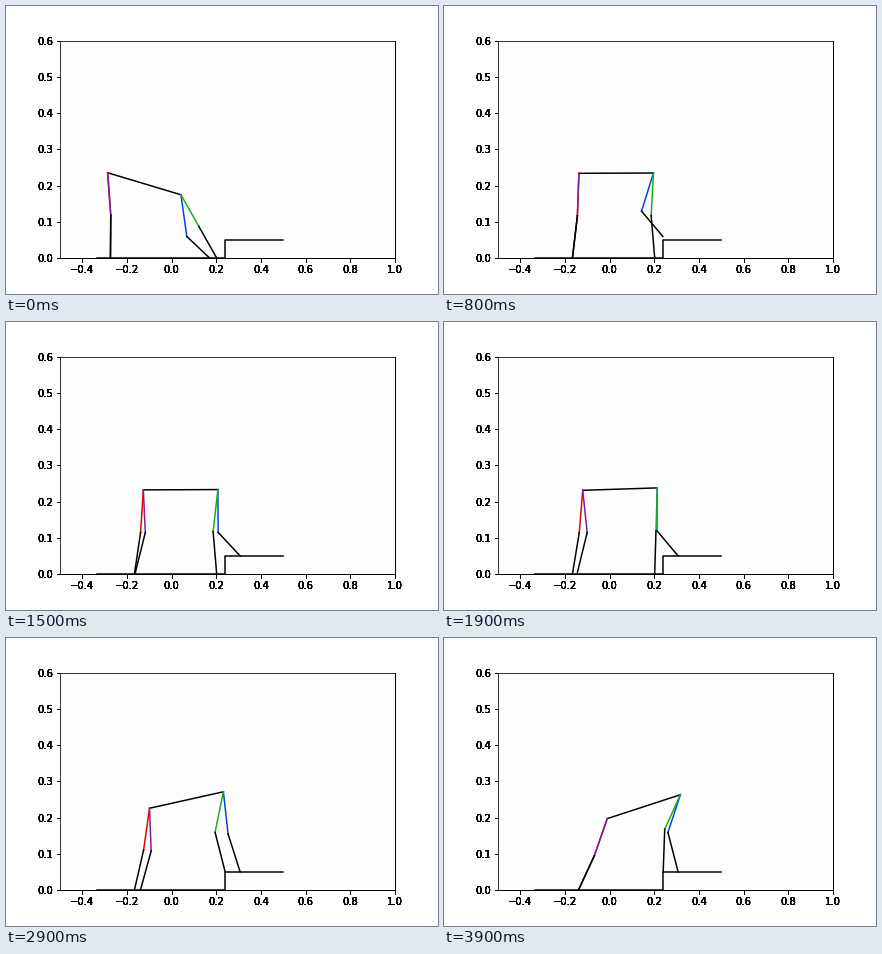
A matplotlib script that plays this animation: 432x288 px, repeating every 4 s.

```python
import numpy as np
import matplotlib.pyplot as plt
from matplotlib.animation import FuncAnimation

FRAMES, INTERVAL = 40, 100
BODY, LEG, REACH = 0.334, 0.118, 0.2355   # REACH: rear hip to planted foot
STEP_X, STEP_Y = 0.24, 0.05
REAR_1, REAR_2, REAR_3 = -.274, -.1665, -.1395

# Front hip key poses: time, x, y
POSES = np.array([(0, .042, .1745), (7, .195, .2347), (18, .212, .2323),
                  (24, .221, .264), (29, .232, .271), (35, .267, .2803),
                  (39, .317, .2628)])


def front_hip(t):
    return np.array([np.interp(t, POSES[:, 0], POSES[:, k]) for k in (1, 2)])


def joint(a, b, ra, rb, side):
    """Point at distance ra from a and rb from b; side picks which one."""
    dist = np.hypot(*(b - a))
    u = (b - a) / dist
    along = (ra**2 - rb**2 + dist**2) / (2 * dist)
    off = np.sqrt(max(ra**2 - along**2, 0))
    return a + along * u + side * off * np.array([u[1], -u[0]])


def foot_at(t, start, steps):
    """Walk through steps of (begin, end, landing point, lift height)."""
    pos, rise = np.array(start), 0
    for begin, end, landing, lift in steps:
        f = np.clip((t - begin) / (end - begin), 0, 1)
        pos = pos + f * (np.array(landing) - pos)
        rise += lift * np.sin(np.pi * f)
    return pos, rise


class Leg:
    def __init__(self, ax, color, side, start, *steps):
        self.upper, = ax.plot([], [], color=color, lw=1.5)
        self.lower, = ax.plot([], [], 'k', lw=1.5)
        self.side, self.start, self.steps = side, start, steps

    def foot(self, t):
        return foot_at(t, self.start, self.steps)

    def draw(self, t, hip):
        pos, rise = self.foot(t)
        foot = pos + (0, rise)
        knee = joint(hip, foot, LEG, LEG, self.side)
        link(self.upper, hip, knee)
        link(self.lower, knee, foot)


def link(line, a, b):
    line.set_data([a[0], b[0]], [a[1], b[1]])


def add_frame(fig, facecolor):
    ax = fig.add_axes([.125, .125, .775, .755], facecolor=facecolor)
    ax.set(xlim=(-.5, 1), ylim=(0, .6),
           xticks=np.arange(-2, 6) / 5, yticks=np.arange(7) / 10)
    ax.xaxis.set_major_formatter('{x:.1f}')
    ax.yaxis.set_major_formatter('{x:.1f}')
    return ax


plt.rcParams['font.family'] = 'DejaVu Sans'
plt.rcParams['font.size'] = 10
fig = plt.figure(figsize=(6, 4), dpi=72, facecolor='white')
ax = add_frame(fig, '#fdfdfd')

# Stacked labels get heavy, hard edges; the top and left edges stay light
for _ in range(6):
    layer = add_frame(fig, 'none')
    layer.spines[['top', 'left']].set_visible(False)

ax.plot([-.333, STEP_X, STEP_X, .5], [0, 0, STEP_Y, STEP_Y], 'k', lw=1.5)
body, = ax.plot([], [], 'k', lw=1.5)

hop = (0, 6, (REAR_2, 0), .02)
red = Leg(ax, 'xkcd:red', -1, (REAR_1, 0),
          hop, (30, 34, (REAR_3, 0), .01))
purple = Leg(ax, 'xkcd:purple', -1, (REAR_1, 0),
             hop, (14, 20, (REAR_3, 0), .01))
blue = Leg(ax, 'xkcd:blue', 1, (.17, 0), (2, 14, (.307, STEP_Y), .0345))
green = Leg(ax, 'xkcd:green', 1, (.202, 0), (19, 26, (STEP_X, STEP_Y), 0))


def draw(t):
    front = front_hip(t)
    rear = joint(front, red.foot(t)[0], BODY, REACH, 1)
    link(body, rear, front)
    for leg, hip in ((red, rear), (purple, rear),
                     (blue, front), (green, front)):
        leg.draw(t, hip)


anim = FuncAnimation(fig, draw, frames=FRAMES, interval=INTERVAL,
                     init_func=lambda: draw(0), repeat=True, repeat_delay=0)
plt.show()
```
